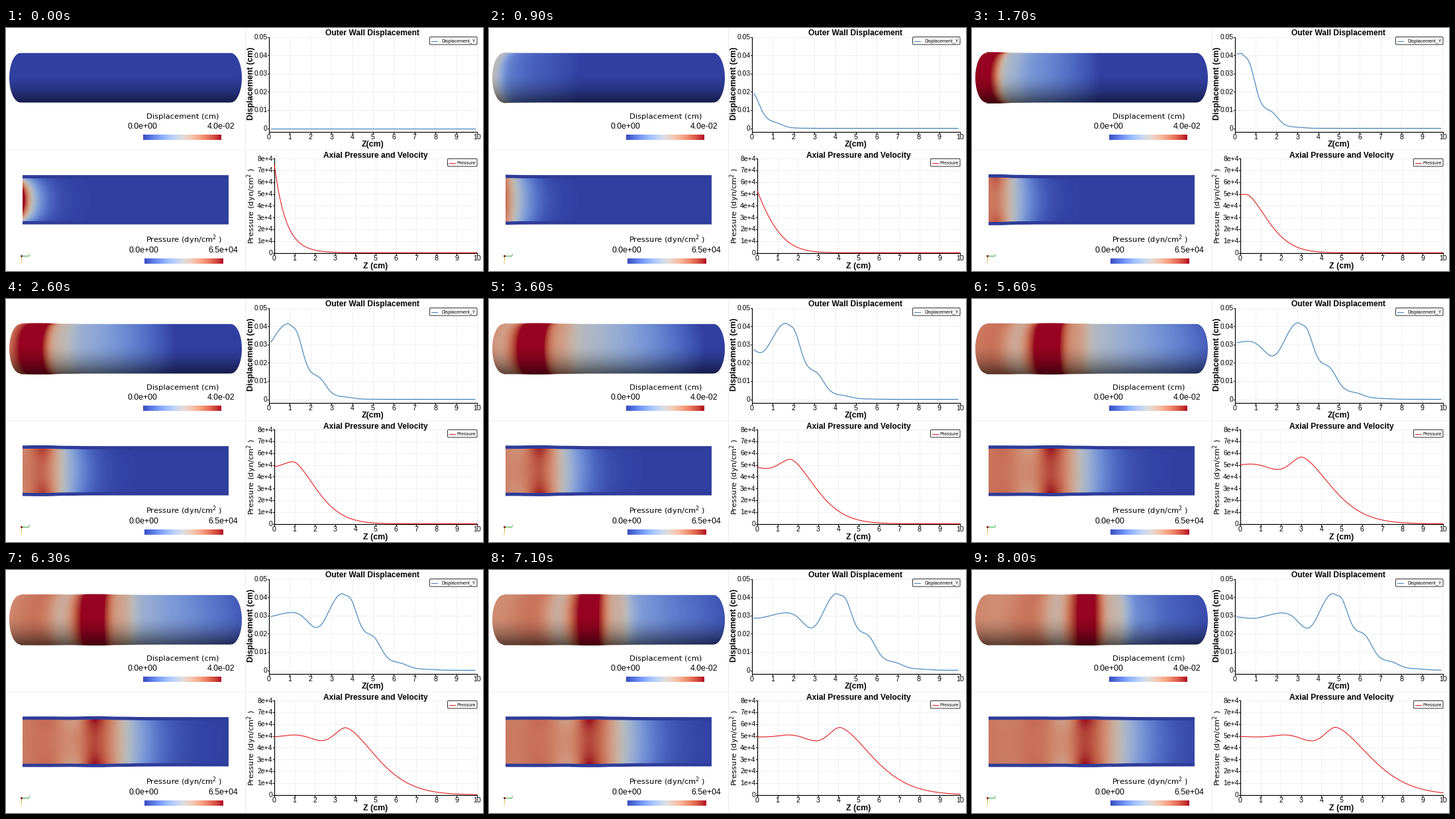
Animation of 720 by 367 pixels, one loop 8.1 s. Source, as a matplotlib script:

```python
import numpy as np
import matplotlib.pyplot as plt
from matplotlib.animation import FuncAnimation
from matplotlib.patches import FancyBboxPatch

WIDTH, HEIGHT, DPI = 720, 367, 100
FRAMES, INTERVAL = 81, 100
PX = 72 / DPI
SANS, ROUND = "Liberation Sans", "DejaVu Sans"
BLUE, RED, GRID = "#377eb8", "#e41a1c", "#efefef"
CMAP = plt.get_cmap("coolwarm")

RISE = 17          # frames until the inlet wall is fully displaced
WAVELENGTH = 2.66  # of the ripples behind the crest, in cm
Z = np.linspace(-1, 11, 481)  # runs past both ends of the 10 cm tube
INSIDE = (Z >= 0) & (Z <= 10)


def crest(n):
    return .93 + .0698 * (n - 26)


def settle(n):
    """Start-up effect at the inlet, fading from 1 to 0."""
    return np.exp(-max(n - RISE, 0) / 18)


def damping(s):
    return np.exp(-.85 * s ** 2 / (abs(s) + .6))


def wall_profile(n):
    """Wall displacement in cm: damped ripples behind, stepped front ahead."""
    s = Z - crest(n)
    phase = 2 * np.pi * s / WAVELENGTH
    peak = .042 - .001 * settle(n)
    base = .029 + .005 * settle(n)
    behind = base + damping(s) * ((peak - base) * np.cos(phase)
                                  + .003 * np.sin(phase) ** 2)
    ahead = np.maximum(s, 0)
    width = 1.75 - .73 * np.exp(-(n - RISE) / 40)
    steps = (.06 + (.16 + .12 * settle(n)) * np.cos(2 * np.pi * (ahead - 1.65) / 1.35))
    steps *= ahead ** 2 / (ahead ** 2 + .3)
    front = peak * np.exp(steps - (ahead / width) ** 1.5)
    rise = np.sin(np.pi / 2 * min(1, n / RISE)) ** 2
    return rise * np.where(s < 0, behind, front)


def flow_profile(n):
    """Axial pressure in dyn/cm2; an inlet jet fades into the wave."""
    s = Z - crest(n)
    swing = 8000 * (1 - settle(n))
    behind = 49500 + swing * damping(s) * np.cos(2 * np.pi * s / WAVELENGTH)
    width = 1.47 + .015 * (n - RISE)
    front = (49500 + swing) * np.exp(-(np.maximum(s, 0) / width) ** 1.6)
    jet = max(0, 1 - n / RISE) ** 2
    return jet * 7.5e4 * np.exp(-1.75 * Z) + (1 - jet) * np.where(s < 0, behind, front)


def curvature(p):
    kernel = np.exp(-np.linspace(-3, 3, 61) ** 2 / 2)
    smooth = np.convolve(np.pad(p, 30, mode="edge"), kernel / kernel.sum(), "valid")
    return np.gradient(np.gradient(smooth, Z), Z)


def axial_stretch(n):
    """Lengthwise wall motion, which only shows in the tube's colour."""
    strength = .028 * np.exp(-((n - 46) / 36) ** 2) * min(1, n / RISE)
    reach = min(11, 2 + .2 * n)
    gate = np.clip((Z - crest(n) + 2) / 2.2, 0, 1)
    fall = 1 - np.clip(Z / reach, 0, 1) ** 1.5
    return strength * gate ** 2 * (3 - 2 * gate) * fall


def pixel_grid(box):
    x0, y0, x1, y1 = box
    return np.meshgrid(np.arange(x0, x1) + .5, np.arange(y0, y1) + .5)


def coverage(distance):
    return np.clip(distance + .5, 0, 1)


def paint(level, shade, alpha):
    rgba = CMAP(np.clip(level, 0, 1))
    rgba[..., :3] *= shade
    rgba[..., 3] = alpha
    return rgba


TUBE_BOX, SLICE_BOX = (0, 30, 360, 120), (20, 215, 342, 303)
TX, TY = pixel_grid(TUBE_BOX)
SX, SY = pixel_grid(SLICE_BOX)
TUBE_Y, SLICE_Y, SCALE = 75.2, 259.4, 31.1


def draw_tube(n, d):
    v = (TY - TUBE_Y) / 37.4
    half = 158.5 + 17 * np.sqrt(np.clip(1 - v ** 2, 0, 1))
    z = 5 + 5 * (TX - 180.5) / half
    level = np.interp(z, Z, np.hypot(d, axial_stretch(n))) / .04
    radius = 37.4 + 34 * np.interp(z, Z, d)
    shade = .84 - .47 * np.clip((v + .2) / 1.2, 0, 1) ** 1.7
    alpha = coverage(half - abs(TX - 180.5)) * coverage(radius - abs(TY - TUBE_Y))
    return paint(level, shade[..., None], alpha)


def draw_slice(d, p):
    z = (SX - 25) / SCALE
    bulge = SCALE * np.interp(z, Z, d)
    away = abs(SY - SLICE_Y)
    inner, outer = 32.3 + bulge, 37.2 + bulge
    # A long-wave flow field is higher off the axis where the profile is convex.
    field = (np.interp(z, Z, p)
             - .18 * (away / inner) ** 2 * np.interp(z, Z, curvature(p)))
    alpha = coverage(outer - away) * coverage(SX - 25) * coverage(336 - SX)
    rgba = paint(field / 6.4e4, .84, alpha)
    fluid = coverage(inner - away)[..., None]
    wall = np.array(CMAP(0.)[:3]) * .8
    rgba[..., :3] = fluid * rgba[..., :3] + (1 - fluid) * wall
    return rgba


fig = plt.figure(figsize=(WIDTH / DPI, HEIGHT / DPI), dpi=DPI, facecolor="white")
ax = fig.add_axes([0, 0, 1, 1])
ax.axis("off")


def text(x, y, s, size, font=SANS, ha="center", va="center_baseline", **kw):
    ax.text(x, y, s, fontsize=size * PX, family=font, ha=ha, va=va, **kw)


def line(xs, ys, color, width=1., **kw):
    return ax.plot(xs, ys, color=color, lw=width * PX, **kw)[0]


def picture(data, box, **kw):
    x0, y0, x1, y1 = box
    return ax.imshow(data, extent=(x0, x1, y1, y0), aspect="auto",
                     interpolation="nearest", **kw)


def chart(left, top, bottom, ticks, title, title_y, xlabel, xlabel_y):
    """Grid, axes and labels; ticks are (y, label) pairs."""
    step = (711 - left) / 10
    for i in range(11):
        x = left + i * step
        line([x, x], [top, bottom], GRID)
        line([x, x], [bottom, bottom + 3], "black")
        text(x, bottom + 7.2, str(i), 10.6)
    for y, label in ticks:
        line([left, 711], [y, y], GRID)
        line([left - 2, left], [y, y], "black")
        text(left - 2.5, y - .5, label, 10.4, ha="right")
    line([left, left, 711], [top, bottom, bottom], "black", 1.2)
    middle = left + 5 * step
    text(middle - .5, title_y, title, 12, weight="bold")
    text(middle - .5, xlabel_y, xlabel, 12.4, weight="bold")


def legend(x, y, label, color):
    ax.add_patch(FancyBboxPatch((x, y), 711 - x, 11.5, fc="white", ec="#333333",
                                boxstyle="round,pad=0,rounding_size=1.5",
                                lw=PX, zorder=4))
    line([x + 2.5, x + 11.5], [y + 6, y + 6], color, zorder=5)
    text(708.5, y + 6, label, 7, ha="right", zorder=5)


def colorbar(x, y, width, title, title_y, low, high):
    picture(CMAP(np.linspace(0, 1, width))[None], (x, y, x + width, y + 8))
    text(x + width / 2 + .5, title_y, title, 11.5, ROUND)
    text(x - 1, y - 13.5, low, 12.4)
    text(x + width, y - 13.5, high, 12.4)


line([360.5, 360.5], [0, HEIGHT], "#ececec")
line([0, WIDTH], [183.5, 183.5], "#f0f0f0")

chart(397, 13.5, 156.5,
      [(151.5 - 27.6 * i, f"{i / 100:g}") for i in range(6)],
      "Outer Wall Displacement", 7, "Z(cm)", 174)
chart(405, 197, 340,
      [(339.5 - 17.8 * i, f"{i}e+4" if i else "0") for i in range(9)],
      "Axial Pressure and Velocity", 191.5, "Z (cm)", 358)
text(369.5, 83.5, "Displacement (cm)", 12.4, weight="bold", rotation=90, va="center")
text(371, 268.5, "Pressure (dyn/cm$^2$ )", 11.5, ROUND, rotation=90, va="center")
legend(639.5, 13.5, "Displacement_Y", BLUE)
legend(666.5, 197.5, "Pressure", RED)
colorbar(207, 161, 118, "Displacement (cm)", 133, "0.0e+00", "4.0e-02")
colorbar(209, 348, 119, "Pressure (dyn/cm$^2$ )", 317, "0.0e+00", "6.5e+04")

# Orientation marker
line([23, 34], [344, 344], "#2fae3c")
line([23, 23], [344, 351], "#c9b13a")
line([23], [344], "#8a1510", marker="o", ms=1.2)
text(35, 342.5, "z", 5, color="#2fae3c")
text(23, 354, "y", 5, color="#d9a520")

tube = picture(np.zeros(TX.shape + (4,)), TUBE_BOX, zorder=3)
section = picture(np.zeros(SX.shape + (4,)), SLICE_BOX, zorder=3)
wall_line = line([], [], BLUE, 1.1, zorder=3)
flow_line = line([], [], RED, 1.1, zorder=3)
ax.set_xlim(0, WIDTH)
ax.set_ylim(HEIGHT, 0)


def update(n):
    d, p = wall_profile(n), flow_profile(n)
    tube.set_data(draw_tube(n, d))
    section.set_data(draw_slice(d, p))
    sampled = (Z >= .1) & (Z <= 9.9)
    wall_line.set_data(397 + 31.4 * Z[sampled], 151.5 - 2760 * d[sampled])
    flow_line.set_data(405 + 30.6 * Z[INSIDE], 339.5 - 17.8e-4 * p[INSIDE])
    return tube, section, wall_line, flow_line


anim = FuncAnimation(fig, update, frames=FRAMES, interval=INTERVAL,
                     init_func=lambda: update(0), repeat=True, repeat_delay=0)
plt.show()
```
